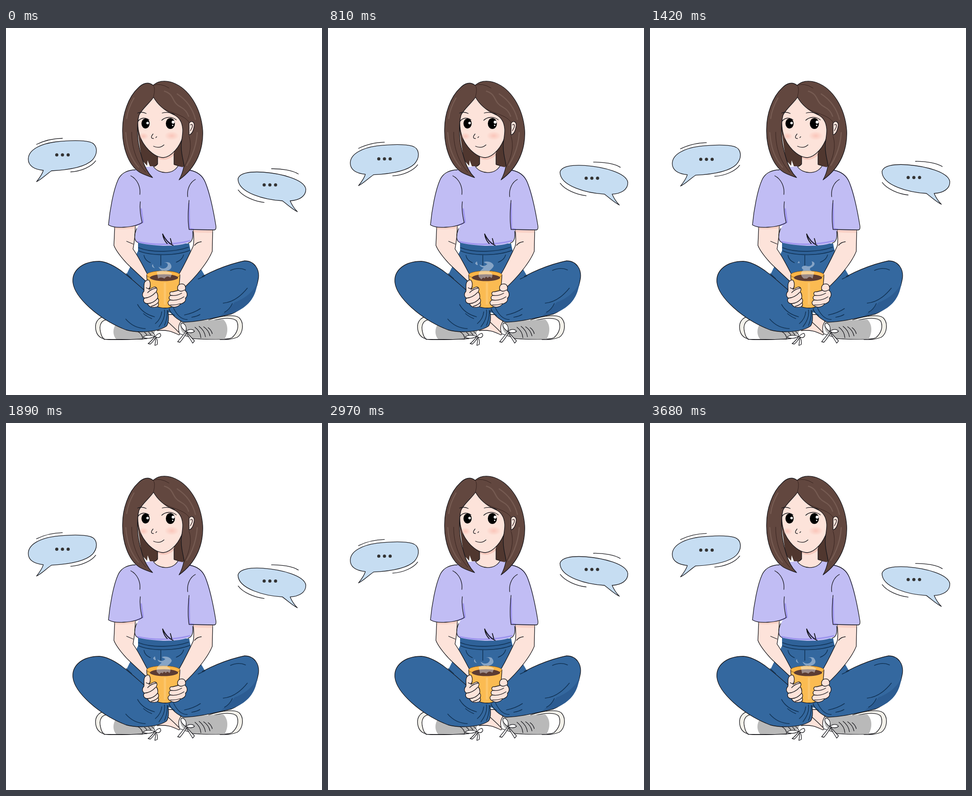
Write an HTML page that moves like this. It is 694 by 807 pixels and loops after 3730 ms.

```html
<!DOCTYPE html>
<html lang="en">
<head>
<meta charset="utf-8">
<style>
html, body { margin: 0; width: 100%; height: 100%; overflow: hidden; background: #fff; }
svg { display: block; }
path, ellipse { stroke-linecap: round; stroke-linejoin: round; }
.ink { stroke: #15151a; stroke-width: 1.3; }
.line { fill: none; stroke: #15151a; stroke-width: 1.3; }
.thick { stroke-width: 1.9; }
.skin { fill: #fde3da; }
.hair { fill: #62473f; }
.jeans { fill: #34689f; }
.fold { fill: none; stroke: #123457; stroke-width: 1.6; }
.shirt { fill: #c1bdf4; }
.bubble { fill: #c6ddf2; }
.dots { fill: #333; }
.steam { fill: #e8eef3; fill-opacity: .45; }
</style>
</head>
<body>
<svg width="694" height="807" viewBox="0 0 694 807">
  <defs>
    <radialGradient id="blush"><stop stop-color="#f9b9ac" stop-opacity=".7"/><stop offset="1" stop-color="#f9b9ac" stop-opacity="0"/></radialGradient>
  </defs>

  <g id="left">
    <path class="bubble ink" d="M49 287C50 268 75 255 108 250.500C140 247 170 247 185 251C201 256 203 275 190 290C175 305 140 312 100 314C88 322 78 333 67 338C75 328 80 320 82 313C62 311 48 303 49 287Z"/>
    <path class="line" d="M67 256C85 247 105 243 124 242.500M142 316.500C165 315 188 305 197 292"/>
    <g class="dots"><circle cx="111.500" cy="279" r="3.500"/><circle cx="124" cy="279" r="3.500"/><circle cx="136.500" cy="279" r="3.500"/></g>
  </g>
  <g id="right">
    <path class="bubble ink" d="M509.500 332C512 319 535 315 565 317C605 320 655 333 658.500 354C659 370 644 379 624 380C627 387 632 396 640 404C628 398 618 388 607 380C570 378 510 363 509.500 332Z"/>
    <path class="line" d="M510 356C520 370 545 381 567 383.500M583 309.500C605 309 630 313 642 321"/>
    <g class="dots"><circle cx="567" cy="345" r="3.500"/><circle cx="579.500" cy="345" r="3.500"/><circle cx="592" cy="345" r="3.500"/></g>
  </g>

  <!-- feet and shoes -->
  <path class="skin ink" d="M330 662C345 656 352 642 356 630L372 630L388 650C386 662 384 672 380 675C366 668 352 662 330 666Z"/>
  <path class="line" d="M354 645C364 654 374 663 379 669"/>
  <path class="ink" fill="#f3f1ea" d="M219 634C202 635 193 649 198 667C202 682 215 685 232 685L300 684L300 655Z"/>
  <path class="line" d="M228 641C210 640 203 652 208 670Q210 680 216 684"/>
  <path fill="#fff" d="M228 642C211 641 204 652 209 670Q211 680 217 684L310 684L336 678L330 660Z"/>
  <path fill="#b9b9b9" d="M242 650C234 660 234 676 242 684L306 683C318 680 326 674 328 665L285 664Z"/>
  <path class="line" d="M215 684.500C240 686 280 685 310 683M304 669Q311 674 310 681M313 669Q319 673 318 679M290 668Q299 673 300 682M320 668Q326 671 326 676"/>
  <path class="ink" fill="#f3f1ea" d="M445 642C475 632 504 629 513 638C523 649 521 671 508 680C494 686 480 685 470 685L450 670Z"/>
  <path class="ink" fill="#fff" d="M450 644C478 637 500 636 507 645C512 657 508 671 496 681C486 686 440 685 412 683L381 672C377 660 380 649 386 644Z"/>
  <path fill="#b9b9b9" d="M386 645L477 641C488 650 489 669 480 684C455 685 432 684 411 682C389 676 377 663 386 645Z"/>
  <path class="line" d="M415 658Q427 667 428 681M424 656Q436 665 438 679M434 657Q445 664 448 677M444 659Q451 664 453 672"/>

  <!-- jeans -->
  <path class="jeans" d="M290 472L402 474L406 492L437 545L400 635L356 625L300 620L264 543L290 490Z"/>
  <path fill="#2f6299" d="M290 472L402 474L404 490C376 502 318 502 291 490Z"/>
  <path class="jeans ink" d="M302 575C274 551 238 515 205 513C168 513 144 533 147 560C151 592 202 640 264 664C290 671 334 669 353 655C359 645 357 630 355 615Z"/>
  <path class="jeans ink" d="M388 575C420 548 475 522 524 512C546 512 558 531 554 553C548 590 525 616 495 629C460 637 425 646 390 647C376 641 364 631 358 618Z"/>
  <path class="jeans" d="M268 541L306 577L355 622L390 577L432 547L380 530L310 530Z"/>
  <path fill="#2c5c92" d="M552 560C542 583 520 597 502 603C495 613 484 623 470 633C522 626 548 600 552 560Z"/>
  <path class="fold" d="M291 483C320 495 370 493 401 482M291 490C320 502 374 501 404 489M303 500Q305 511 317 516M390 499Q387 510 374 515M340 500L340 522M264 540L276 551M437 545L422 552M289 608C296 621 308 630 326 635M302 628Q310 635 320 639M263 640Q280 660 306 661M348 620Q351 637 336 657M342 624Q341 639 328 650M354 621Q355 638 348 654M359 621Q363 628 370 632M368 616C378 637 390 641 398 641M392 631Q412 627 427 617M408 636Q420 634 426 630M477 605Q505 603 530 572M497 606Q491 619 480 625M526 532Q511 525 493 533"/>

  <!-- laces -->
  <path class="ink" fill="#fff" d="M327 678C316 674 306 675 301 680C309 684 319 683 327 678C334 672 339 668 340 676C338 682 332 682 327 678C322 685 318 690 312 694L317 695Q325 688 328 681Q329 689 327 698L332 696Q334 687 329 680M394 667C381 657 382 648 389 649C395 653 397 660 395 667C403 661 411 662 414 667C408 672 402 671 395 667C390 675 383 682 377 690L382 691Q391 681 396 670Q402 680 410 693L414 688Q406 680 397 669"/>

  <!-- arms -->
  <path class="skin ink" d="M239 432L237 478C242 492 262 515 272 524L306 556L320 556L312 544C302 526 294 508 279 486C282 470 284 455 284 430Z"/>
  <path class="skin ink" d="M411 440C413 460 413 472 411 480C401 502 390 524 378 545L372 558L388 574C417 548 444 514 453 491L454 440Z"/>
  <path class="line" d="M265 469L279 475M414 478Q419 471 429 470"/>
  <path fill="#f7c7ba" opacity=".65" d="M239 437L284 434L283 440Q262 444 239 442ZM411 445L454 444L453 450Q432 451 412 449Z"/>

  <!-- shirt -->
  <path class="shirt" d="M302 306C284 313 262 311 248 330C236 355 228 400 225 433C230 439 246 438 260 438C276 437 288 435 297 429L292 432C285 446 280 463 287 471C304 476 326 478 345 479C376 479 400 476 407 466C412 458 411 448 410 444C430 445 446 445 458 444C462 441 461 435 459 425C453 385 445 345 432 327C422 315 405 312 390 305L378 302L324 304Z"/>
  <path fill="none" stroke="#9d94ee" stroke-width="3" d="M297 398L301 427L286 434M402 386L403 441L412 443M289 470Q345 482 404 468M348 460Q356 473 366 476"/>
  <path class="line" d="M284 312C266 312 252 320 246 334C236 356 228 400 225 433Q237 440 260 438C276 437 288 435 299 428C295 411 293 398 295 382M274 325C288 332 296 349 294 366M404 313C422 316 432 325 438 340C449 368 456 404 461 435Q462 443 458 444L402 443C399 425 400 400 402 379M416 333C404 339 397 355 399 371M287 441C281 456 281 468 290 472M410 447C412 464 407 471 400 473"/>
  <path class="line thick" d="M344 453C350 466 358 474 367 478M344 453Q346 466 354 474M361 463L364 474"/>

  <!-- mug -->
  <path class="ink" fill="#fbbb52" d="M309 543C310 572 320 604 330 612C342 617 358 617 366 612C376 602 381 570 382 543Z"/>
  <ellipse fill="#fbb546" stroke="#8a5a1c" cx="345.500" cy="543" rx="36.500" ry="9"/>
  <ellipse fill="#5c3c33" cx="347" cy="549" rx="31" ry="7.500"/>
  <path fill="none" stroke="#fdcd7d" stroke-width="5" opacity=".6" d="M349 562L349 606"/>
  <g id="steam" class="steam">
    <path d="M323 519C318 523 322 527 327 528Q322 523 323 519ZM346 516C356 514 359 523 350 528C342 531 338 526 335 525C339 534 348 537 358 532C366 528 364 521 359 516Q353 514 346 516ZM331 536Q347 529 365 540L361 549Q354 543 348 551Q340 546 334 551Z"/>
    <path d="M323 517L327 513L329 521Q325 522 323 517ZM342 515C351 511 363 516 364 523C361 531 353 532 355 537C363 538 362 546 359 550Q354 544 351 550Q347 544 344 551Q341 546 337 553L331 547C329 536 337 532 342 527Q333 525 333 520Q342 527 350 519Z"/>
    <path d="M324 517L327 512L329 517ZM355 513C365 515 362 523 355 526C346 530 355 536 361 536L357 551Q350 544 345 551L338 551C330 545 330 537 337 532C328 525 338 522 343 523C352 526 359 521 355 513Z"/>
  </g>

  <!-- hands -->
  <path class="skin ink" d="M306 557C301 562 304 571 303 579C298 584 299 591 304 594C300 599 303 606 311 606C313 614 322 616 332 613Q337 610 334 604C336 600 335 596 333 594C334 590 333 584 330 580C334 573 330 568 324 570L314 575C319 566 317 553 311 554Z"/>
  <path class="line" d="M308 571Q314 576 317 569M304 594Q318 593 329 581M311 606Q325 605 333 594M319 612Q328 610 334 604M311 582Q318 574 330 572"/>
  <path class="skin ink" d="M389 563C380 561 374 568 378 577L366 580C359 579 358 585 362 588C357 590 357 596 361 598C354 601 354 607 361 611C369 617 380 612 383 607C391 605 396 600 394 594C400 589 398 580 393 577C396 571 394 565 389 563Z"/>
  <path class="line" d="M377 575Q383 582 392 576M362 588Q374 590 386 583M361 598Q376 601 391 591M361 609Q372 610 383 606"/>

  <!-- head -->
  <path fill="#50372f" d="M286 205L334 270L334 304L316 304L311 291L310 303L298 290ZM366 262L390 225L394 300L388 306L369 302Z"/>
  <path class="skin" d="M333 275L369 270L369 301L378 303C366 323 336 323 324 305L333 300Z"/>
  <path fill="#f7c9bd" d="M333 280Q350 288 369 274L369 280Q350 296 333 286Z"/>
  <path class="line" d="M333 281L333 299Q330 303 324 305C336 322 366 323 378 303L369 300L369 276"/>
  <path class="skin ink" d="M324 150C309 165 291 182 290 200C288 222 293 247 313 268C326 281 338 285 346 285C364 283 382 261 389 237L392 200Z"/>
  <path class="hair ink" d="M323 126C312 117 300 122 291 131C268 152 256 190 256 222C255 258 267 300 293 317C303 323 314 326 322 329C311 318 304 305 299 287C288 254 286 217 292 192C299 177 316 165 324 152C332 167 348 182 367 190C381 196 387 208 388 222C389 236 384 250 385 262C385 278 389 288 391 302Q388 320 380 334C419 306 434 266 432 225C428 174 401 133 366 120C350 115 334 116 323 126Z"/>
  <path class="skin ink" d="M402 209C408 202 415 207 413 217C411 228 407 234 402 235Z"/>
  <path class="line" d="M405 213Q411 210 409 218L405 226"/>
  <g fill="none" stroke="#7d6259" stroke-width="2.500" opacity=".75">
    <path d="M348 139C371 146 363 164 384 174Q397 181 401 194M376 145C396 158 410 177 416 201M420 230C418 262 407 286 397 302M263 230C265 260 274 287 291 306M281 154Q268 176 265 199"/>
  </g>
  <path fill="none" stroke="#37231f" d="M323 126Q329 131 324 151M323 126Q339 120 358 132M276 229C276 265 287 294 307 317M402 238C409 259 403 285 391 306M346 177C366 189 393 191 403 209"/>
  <ellipse fill="url(#blush)" cx="302" cy="238" rx="11" ry="8"/>
  <ellipse fill="url(#blush)" cx="364" cy="237" rx="16" ry="10"/>
  <ellipse cx="306.500" cy="210" rx="9" ry="11"/>
  <ellipse cx="361" cy="210" rx="10" ry="12"/>
  <g fill="#fff"><circle cx="311" cy="209" r="2.800"/><circle cx="367" cy="207" r="3.200"/><circle cx="366" cy="214" r="1.500"/></g>
  <path class="line" d="M290 205C296 197 306 196 314 202M342 203C350 195 364 194 374 202M323 233C318 239 318 243 324 243M329 241L331 239M324 260Q337 266 347 257"/>
  <path class="line" stroke-width="1" d="M289 187Q299 183 308 188M343 187Q356 183 370 190"/>
</svg>
<script>
const LOOP = 3730, POSE = 195;
// Vertical drift of the left bubble: [time, offset]
const drift = [[0, 0], [285, -3.8], [810, 8.7], [1115, 13.8], [1420, 9.7],
  [1890, -1.4], [2100, -3.6], [2470, 4.5], [2970, 13.7], [3680, .4]];
const left = document.getElementById('left');
const right = document.getElementById('right');
const wisps = [...document.getElementById('steam').children];

function key(i) {
  const n = drift.length, [t, y] = drift[(i + n) % n];
  return [t + Math.floor(i / n) * LOOP, y];
}

function slope(i) {
  const [t0, y0] = key(i - 1), [, y] = key(i), [t1, y1] = key(i + 1);
  return (y - y0) * (y1 - y) <= 0 ? 0 : (y1 - y0) / (t1 - t0);
}

function driftAt(t) {
  const i = drift.findLastIndex(k => k[0] <= t);
  const [t0, y0] = key(i), [t1, y1] = key(i + 1);
  const d = t1 - t0, u = (t - t0) / d, v = 1 - u;
  return v * v * (1 + 2 * u) * y0 + u * u * (1 + 2 * v) * y1
    + d * u * v * (v * slope(i) - u * slope(i + 1));
}

function draw() {
  const t = performance.now() % LOOP, y = driftAt(t);
  left.setAttribute('transform', `translate(0 ${y})`);
  right.setAttribute('transform', `translate(0 ${-1.68 * y})`);
  const pose = Math.min(18, Math.floor(t / POSE + .72)) % 3;
  wisps.forEach((w, i) => w.style.display = i === pose ? '' : 'none');
  requestAnimationFrame(draw);
}
draw();
</script>
</body>
</html>
```
